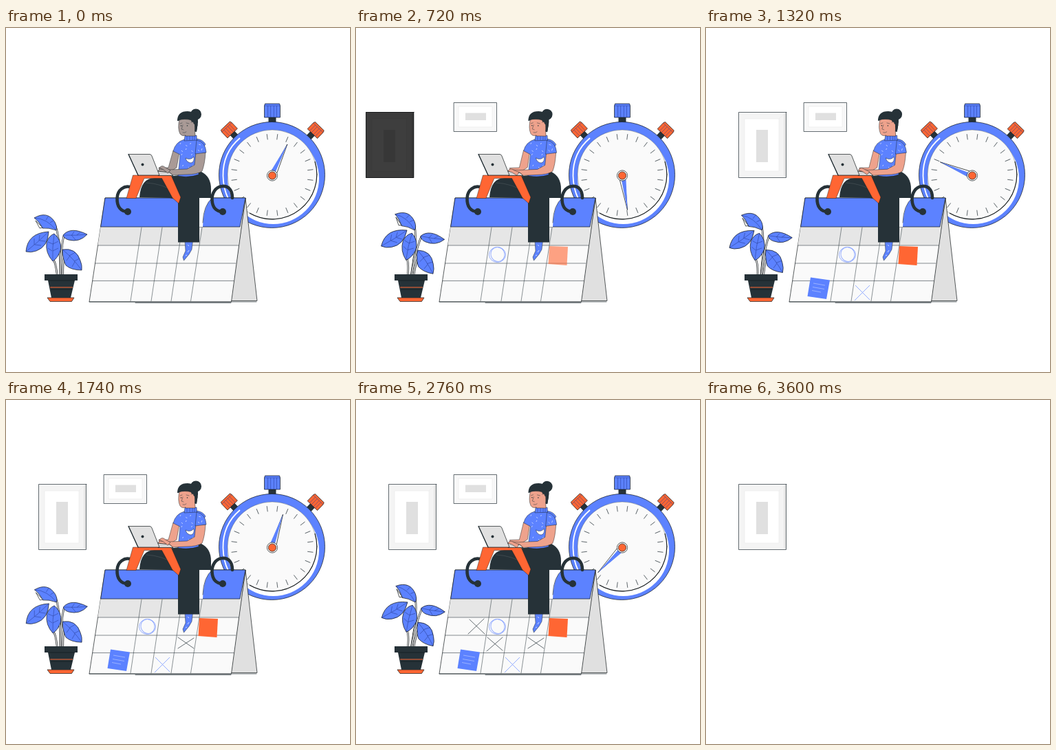
An HTML page that plays this animation: 500 by 500 pixels, repeating every 3630 ms.

```html
<!DOCTYPE html>
<html lang="en">
<head>
<meta charset="utf-8">
<title>Planning</title>
<style>
html, body { margin: 0; width: 100%; height: 100%; overflow: hidden; background: #fff; }
svg { display: block; width: 500px; height: 500px; --skin: #eea28c; }
.blue { fill: #5c82ff; }
.orange { fill: #ff6633; }
.dark { fill: #263238; }
.skin { fill: var(--skin); }
.edge { stroke: #14191b; stroke-width: .7; stroke-linejoin: round; }
.line { fill: none; stroke: #263238; stroke-width: .7; stroke-linecap: round; }
.ring { fill: none; stroke: #263238; stroke-width: 4.6; stroke-linecap: round; }
.sketch { fill: none; stroke: #8ca6ff; stroke-width: .9; }
.vein { fill: none; stroke: #24398a; stroke-width: .5; }
#body .edge, #legs .edge, #fingers { stroke-width: .45; }
</style>
</head>
<body>
<svg viewBox="0 0 500 500">
  <g id="frameA">
    <path fill="#f4f4f4" d="M47 122H117V218H47Z"/>
    <path fill="#e6e6e6" d="M113 126L117 122V218L113 214Z"/>
    <path fill="#fff" d="M56 132H106V208H56Z"/>
    <path fill="#e0e0e0" d="M73 148H90V195H73Z"/>
    <path fill="none" stroke="#e8e8e8" stroke-width=".6" d="M56 132H106V208H56ZM106 132L117 122"/>
    <path class="line" d="M117 122.500H47.500V217.500H116.500V122.500"/>
  </g>
  <g id="scene">
    <g id="frameB">
      <path fill="#f8f8f8" d="M142 108H205V151H142Z"/>
      <path fill="#fff" stroke="#e8e8e8" stroke-width=".6" d="M149 114H198V144H149Z"/>
      <path fill="#e0e0e0" d="M159 123.500H189V134H159Z"/>
      <path class="line" d="M142.500 108.500H204.500V150.500H142.500Z"/>
    </g>

    <g id="watch">
      <g id="knobs"></g>
      <circle class="blue edge" cx="386.500" cy="213.500" r="77"/>
      <path fill="none" stroke="#fff" stroke-width="1.800" d="M340 160Q315 181 315.500 215Q316 234 323 248"/>
      <circle cx="388.500" cy="218.500" r="66.500" fill="#fff"/>
      <circle cx="387" cy="213" r="65" fill="#fafafa"/>
      <circle class="line" stroke-opacity=".5" cx="387" cy="213" r="65"/>
      <path fill="none" stroke="#14191b" stroke-width="1.100" d="M449 194A65 65 0 0 1 354 269"/>
      <g id="ticks" class="line"></g>
      <g id="hand">
        <path class="edge" fill="#fff" d="M387 164L391.500 208H384Z"/>
        <path class="blue" d="M387 164L389 208H382.500Z"/>
      </g>
      <circle class="edge" cx="387" cy="214.500" r="7.600" fill="#fff"/>
      <circle class="orange edge" cx="387" cy="214.500" r="5.600"/>
    </g>

    <g id="calendar">
      <path class="edge" fill="#e0e0e0" d="M348 247L365 396.500H327Z"/>
      <path class="edge" fill="#fafafa" d="M144 247H348L327.500 398H121Z"/>
      <path fill="#e6e6e6" d="M137.600 289H341L337.500 316H133.500Z"/>
      <path class="blue edge" d="M144 247H348L340 289H137.600Z"/>
      <path fill="#fff" d="M280 247H300Q287 257 286 289H280Z"/>
      <path class="line" d="M300 247Q287 257 286 283"/>
      <path class="line" stroke-opacity=".8" d="M133.500 316H338M129.500 342H334M125.700 367.500H331"/>
      <path class="line" stroke-opacity=".75" d="M197 290L181 397M227 290L211 397M256 290L240 397M285 290L268.500 397"/>
      <path class="line" d="M121 398H364M188 399.500H327"/>
    </g>

    <g id="marks">
      <g id="circle" class="sketch">
        <ellipse cx="205.500" cy="329.500" rx="12" ry="11"/>
        <ellipse cx="206" cy="329" rx="10" ry="10.500" transform="rotate(-30 206 329)"/>
      </g>
      <path id="square" class="orange" d="M281 317L308 318L306.500 345L279.500 343Z"/>
      <g id="note">
        <path class="blue" d="M152 362.500L180 366.500L175 394L147.500 390Z"/>
        <path fill="none" stroke="#aabdff" stroke-width=".8" d="M156 371L173 374M155 376.500L172 379.500M154 381.500L167 384"/>
      </g>
      <path id="crossA" class="sketch" d="M217 374L238 395M238 374L216 396"/>
      <path id="crossB" class="line" d="M250 345L273 361M273 346L250 361"/>
      <path id="crossC" class="line" d="M191 345L213 364M213 345L190 365"/>
      <path id="crossD" class="line" d="M165 319L187 340M186 318L163 340"/>
    </g>

    <path class="ring" d="M183 232C172 227 162 236 161.500 247C161 260 167 267 177 267"/>
    <circle class="dark" cx="177" cy="267" r="5"/>
    <path class="ring" d="M329 247C329 233 321 229 314 230C304 231 299 241 299.500 250C300 261 306 267 315 267"/>
    <circle class="dark" cx="315" cy="267" r="5"/>

    <g id="legs">
      <path class="blue edge" d="M260 309H271.500L270 322L266 329L258.500 338L257 333L261 324Z"/>
      <path fill="none" stroke="#fff" stroke-width=".7" d="M264 315L266 317M266 323L264 326M261 331L263 330"/>
      <path class="dark" d="M194 246Q196 218 216 218L252 214L284 209Q298 216 298 234V247H281V311.500H250V250L238 247Z"/>
      <path fill="none" stroke="#4d585c" stroke-width=".6" d="M204 225Q226 226 248 239"/>
      <path class="orange edge" d="M184.500 214H240L254 246L251 255L242 247L226.500 218.500H201L189 247.500H175Z"/>
    </g>

    <g id="body">
      <g id="farArm">
        <path class="skin edge" d="M243 178L252 181L248 203L238 209L223 207L222 203L236 203Z"/>
      </g>
      <path class="skin" d="M261 150H274L276 160H260Z"/>
      <path class="blue edge" d="M259 162L277 161Q286 162 290 169L280 184V213Q266 218 250 215L253 184L243 179Q246 166 259 162Z"/>
      <path class="blue edge" d="M260 156.500L277 156L277.500 163L259 164Z"/>
      <path class="vein" d="M263 157V163M267 157V163M271 157V163M274 157V163"/>
      <path class="edge" fill="#fff" d="M261 189Q268 193 273 187Q274 195 269 196Q263 196 261 189Z"/>
      <g id="dashes" fill="none" stroke="#dbe4ff" stroke-width=".8"></g>
      <g id="nearArm">
        <path class="skin edge" d="M276 181L290 181Q289 198 285 208Q278 213 262 213L238 214L228 210L221 208L223 205L236 206L263 205L274 199Z"/>
        <path class="blue edge" d="M277 163Q290 165 291 181L275 183Z"/>
        <path fill="none" stroke="#dbe4ff" stroke-width=".8" d="M280 169L283 170M285 175L284 178M279 177L281 179"/>
      </g>
      <g id="head">
        <circle class="dark" cx="276" cy="125.500" r="8"/>
        <path class="dark" d="M249 135Q249 121 264 121Q280 122 279 137L277 151L270 150L256 134Z"/>
        <path class="skin edge" d="M252 133Q249 146 253 154Q256 158 261 156V157H275L274.500 149Q277 143 274 137Q269 131 252 133Z"/>
        <path class="dark" d="M249 135Q252 126 267 125Q278 130 278.500 141L277 150L274.500 150L274 140Q270 138 268 132Q259 131 249 135Z"/>
        <path class="skin" d="M269 137Q273 135 273 140Q272 144 269 142Z"/>
        <path class="line" style="stroke-width:.5" d="M253 139L256 138M262 138L266 139M257 141L255 147L258 148M257 152Q260 153 262 151M269 137Q272 135 273 139"/>
        <circle class="dark" cx="254.500" cy="142" r=".8"/>
        <circle class="dark" cx="263.500" cy="142" r=".8"/>
      </g>
    </g>

    <g id="laptop">
      <path class="edge" fill="#d8d8d8" d="M220 208L238 210L243 214.500H221Z"/>
      <path class="edge" fill="#e0e0e0" d="M178 183.500H209Q211 183.500 212 186L223 214H192Z"/>
      <path class="line" style="stroke-width:1.300" d="M178 183.500L192 214"/>
      <circle class="dark" cx="198.500" cy="198.500" r="2"/>
    </g>
    <path id="fingers" class="skin edge" d="M223 203Q227 198 232 203L239 207L235 211L229 206Z"/>

    <g id="plant">
      <g id="leaves">
        <g id="stems" fill="none"></g>
        <path class="blue edge" d="M41 276Q60 265 71 282Q75 289 73 294Q62 290 53 291Q48 281 41 276Z"/>
        <path class="edge" fill="#fff" d="M43 280L53 290L49 291Z"/>
        <path class="blue edge" d="M29 325Q31 298 62 296Q61 318 44 324Q36 327 29 325Z"/>
        <path class="blue edge" d="M70 299Q81 308 79.500 322Q76 334 68 339Q57 327 59 312Q62 302 70 299Z"/>
        <path class="blue edge" d="M83 301Q94 288 118 300Q107 312 91 308Q84 306 83 301Z"/>
        <path class="blue edge" d="M82 322Q102 319 108 338Q111 345 110 352Q95 352 87 345Q82 335 82 322Z"/>
        <path class="vein" d="M41 276Q60 277 73 294M58 279L62 273M64 283L69 280M29 325Q46 312 62 296M41 315L41 306M48 309L49 301M42 315L51 316M49 309L57 310M70 299Q67 320 68 339M68 314L61 311M68 314L76 310M67 324L61 320M68 324L76 320M83 301Q101 302 118 300M95 302L99 296M103 301L108 297M96 302L101 308M82 322Q97 334 110 352M92 331L101 326M99 339L107 335M93 331L88 338M100 340L96 347"/>
      </g>
      <path class="orange edge" d="M60 392H99L95.500 397.500H64Z"/>
      <path class="dark" d="M56 358H104V367H100L94 392H66L61 367H56Z"/>
      <path fill="none" stroke="#ff6633" stroke-width="1.200" d="M64 377H97"/>
      <path fill="none" stroke="#11181b" stroke-width=".7" d="M62 367H100M65 380H96"/>
    </g>
  </g>
</svg>
<script>
const LOOP = 3630, SWAY = 1800, OUT = 3590;
const $ = id => document.getElementById(id);
const svg = document.querySelector('svg');

function path(parent, d, attrs = {}) {
  const p = document.createElementNS('http://www.w3.org/2000/svg', 'path');
  p.setAttribute('d', d);
  for (const key in attrs) p.setAttribute(key, attrs[key]);
  $(parent).append(p);
}

for (let i = 0; i < 24; i++) {
  path('ticks', 'M387 154V161.500', { transform: `rotate(${i * 15 + 7.5} 387 213.500)` });
}

function knob(angle, w, top, h, neck, color) {
  const half = w / 2, x = 387, bottom = top + h;
  const ribs = [-.28, -.1, .1, .28].map(k => `M${x + k * w} ${top + 3}V${bottom}`).join('');
  const parts = [
    [`M${x - neck} 138V${bottom - 2}H${x + neck}V138Z`, 'dark'],
    [`M${x - half + 1} ${top}H${x + half - 1}L${x + half} ${top + 3}V${bottom}H${x - half}V${top + 3}Z`, color + ' edge'],
    [ribs + `M${x - half} ${top + 3}H${x + half}`, 'vein']
  ];
  for (const [d, cls] of parts) path('knobs', d, { class: cls, transform: `rotate(${angle} 387 214)` });
}
knob(0, 23, 110, 20, 5.5, 'blue');
knob(-43.5, 20, 115, 15, 4.5, 'orange');
knob(44, 20, 115, 15, 4.5, 'orange');

// White stems with a dark outline
for (const d of ['M72 288Q80 310 79 372', 'M69 337Q74 345 75 372', 'M84 302Q78 330 80 372', 'M85 330Q82 340 83 372']) {
  path('stems', d, { stroke: '#14191b', 'stroke-width': 2.6 });
  path('stems', d, { stroke: '#fff', 'stroke-width': 1.2 });
}

// Small strokes woven into the shirt
for (let i = 0; i < 18; i++) {
  const x = 254 + (i * 7.3) % 21, y = 167 + Math.floor(i / 3) * 8 + (i % 2) * 3;
  if (y < 186 || y > 197) path('dashes', `M${x} ${y}l${i % 2 ? 2 : -1} 2`);
}

// id, start, end of each fade
const fades = [
  ['circle', 330, 600], ['square', 600, 800], ['note', 830, 1030],
  ['crossA', 1050, 1250], ['crossB', 1450, 1650],
  ['crossC', 1870, 2070], ['crossD', 2270, 2500]
];
const ramp = (t, a, b) => Math.min(1, Math.max(0, (t - a) / (b - a)));
const turn = (id, angle, x, y) => $(id).setAttribute('transform', `rotate(${angle} ${x} ${y})`);

function slide(id, t, a, b) {
  const k = ramp(t, a, b), el = $(id).style;
  el.display = k > 0 ? '' : 'none';
  el.transform = `translateX(${-43.5 * (1 - k)}px)`;
  el.filter = k < 1 ? `brightness(${k})` : 'none';
}

function draw(t) {
  const swing = Math.abs(Math.sin(Math.PI * t / SWAY)) ** 1.6;
  $('scene').style.display = t < OUT ? '' : 'none';
  svg.style.setProperty('--skin', t < 30 ? '#a99a96' : '#eea28c');
  slide('frameA', t, 650, 940);
  slide('frameB', t, 180, 470);
  for (const [id, a, b] of fades) $(id).style.opacity = ramp(t, a, b);

  turn('hand', 25.5 + t * .2024, 387, 214.5);
  turn('leaves', swing * 10.5, 80, 366);
  turn('body', swing * 1.1, 267, 214);
  turn('farArm', -swing * 3, 247, 180);
  turn('nearArm', -swing * 1.5, 283, 180);
  $('fingers').setAttribute('transform', `translate(${-swing * 2} ${swing * 3}) rotate(${-swing * 8} 239 207)`);
}

const start = performance.now();
function tick() {
  draw((performance.now() - start) % LOOP);
  requestAnimationFrame(tick);
}
tick();
</script>
</body>
</html>
```
